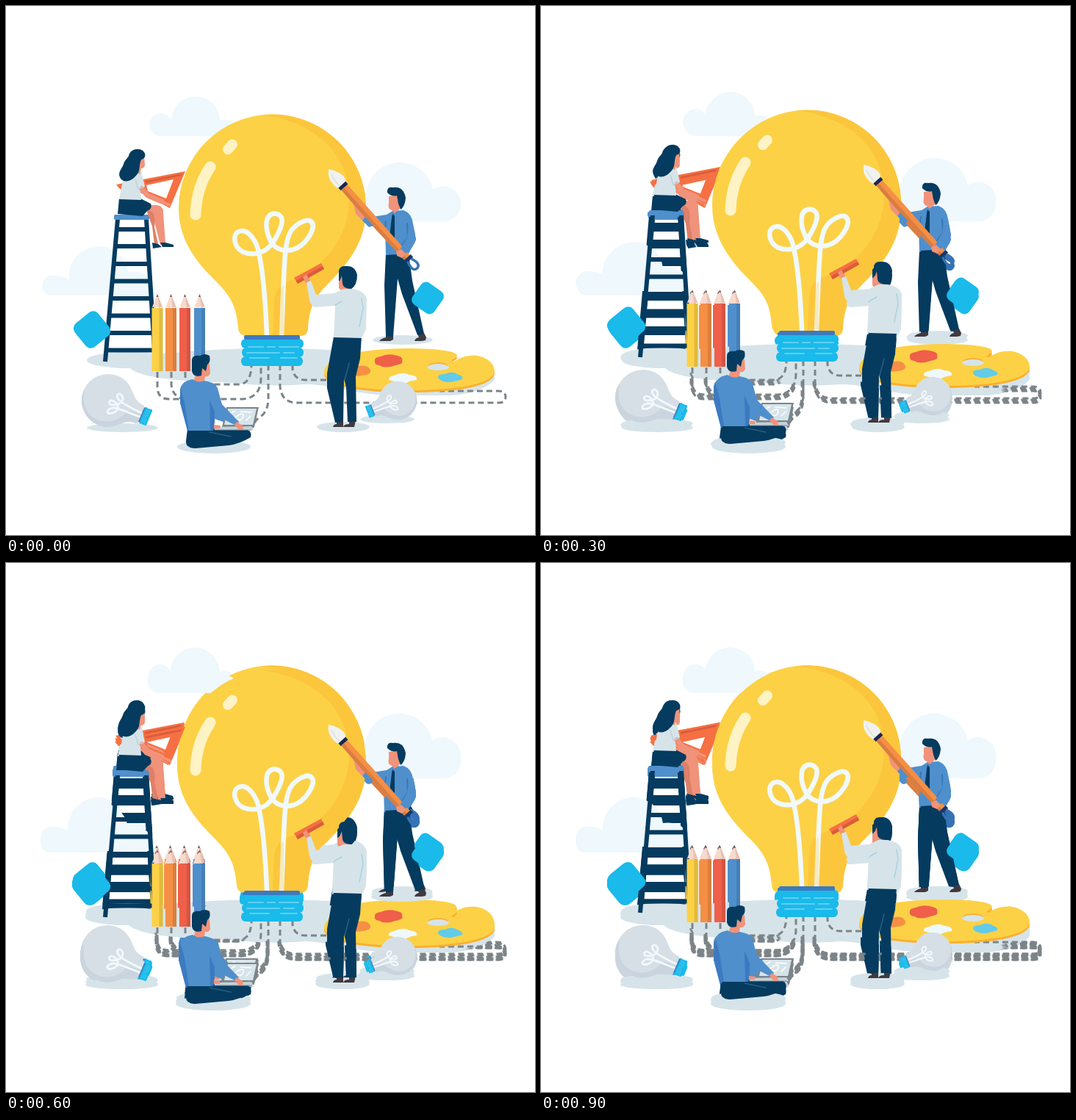
Recreate the animation shown at these times as an HTML page without scripts. Size 720 px wide and 720 px high, loop 1000 ms.

```html
<!DOCTYPE html>
<html lang="en">
<head>
<meta charset="utf-8">
<title>Creative team</title>
<style>
  html, body { margin: 0; width: 100%; height: 100%; overflow: hidden; background: #fff; }
  svg { display: block; width: 100vw; height: 100vh; }
  .navy { fill: #043b5f; }
  .blue { fill: #4f8fcc; }
  .deep { fill: #3b7ac0; }
  .cyan { fill: #1abaea; }
  .pale { fill: #d6e4ea; }
  .mist { fill: #eff8fc; }
  .skin { fill: #f0937a; }
  .red { fill: #ef5f4a; }
  .orange { fill: #f58f45; }
  .rust { fill: #f67043; }
  .sun { fill: #fcd146; }
  .shoe { fill: #3f3a40; }
  .line { fill: none; stroke-linecap: round; stroke-linejoin: round; }
  .wires { fill: none; stroke: #7c8488; stroke-width: 3; stroke-dasharray: 8 5; }
  .rungs { fill: none; stroke: #043b5f; stroke-width: 6; }
</style>
</head>
<body>
<svg viewBox="0 0 720 720">
<defs>
  <path id="glass" d="M235 275A127.5 127.5 0 0 1 490 275C490 318 468 348 441 375C421 395 413 408 411 437Q411 449 400 449H328Q316 449 316 437C313 408 306 395 286 375C258 348 235 318 235 275Z"/>
  <path id="shade" d="M348 148.300A127.500 127.500 0 0 1 490 275C490 318 468 348 441 375C421 395 413 408 411 437Q411 449 400 449H363L365 402C366 388 372 380 384 375C430 360 467 317 467 262C467 205 425 158 348 148.300Z"/>
  <path id="coil" class="line" d="M355 447C353 400 350 365 345 340C342 319 329 303 318 306.500C307 310 310 328 322 334.500C337 341 354 336 364 321C373 306 384 285 366 282.500C350 283 354 306 358.500 316C364 330 376 335 391 331.500C408 326 421 304 417 295.500C413 288 399 293 389.500 304C378 318 379 350 375 447"/>
  <g id="cap">
    <g class="cyan">
      <rect x="320" y="453" width="85" height="13" rx="6"/>
      <rect x="321" y="465" width="84" height="13" rx="6"/>
      <rect x="320" y="477" width="84" height="13" rx="6"/>
      <rect x="325" y="458" width="75" height="26"/>
    </g>
    <rect class="deep" x="324" y="448" width="76" height="6" rx="2"/>
    <path class="line" stroke="#5fd0f3" stroke-width="2" d="M330 464H350M356 464H366M372 464H398M328 472H372M378 472H392M332 479H358M374 479H396"/>
  </g>
  <g id="dim">
    <use href="#glass" fill="#d6dfe6"/>
    <use href="#shade" fill="#cad4de"/>
    <use href="#coil" stroke="#f2f9fc" stroke-width="10"/>
    <use href="#cap"/>
  </g>
  <g id="pencil">
    <path d="M0 19H15V105H0Z"/>
    <path fill="#000" fill-opacity=".11" d="M10 19H15V105H10Z"/>
    <path fill="#f6dacd" d="M7.500 0L15 19Q12.500 16 10 19Q7.500 16 5 19Q2.500 16 0 19Z"/>
    <path fill="#e8bfb2" d="M7.500 0L15 19Q12.500 16 10 19Z"/>
    <path fill="#6b5d63" d="M7.500 0L9 4H6Z"/>
  </g>
  <path id="board" d="M433 498C434 478 478 467 545 466C590 466 614 470 614 476C613 480 604 481 608 484C613 485 615 476 638 475.500C658 478 665 489 665 497C664 515 610 523 550 523C480 523 433 514 433 498Z"/>

  <g id="art">
    <g class="mist">
      <path d="M210 177A15.500 15.500 0 1 1 225 156A33 33 0 0 1 291 156Q312 150 320 177Z"/>
      <path d="M480 293V255H490A46 46 0 0 1 581 250A24 24 0 1 1 599 293Z"/>
      <path d="M60 394A13.500 13.500 0 1 1 66 367Q78 367 86 373A40 40 0 0 1 166 362Q201 358 204 394Z"/>
    </g>
    <g class="pale">
      <ellipse cx="166" cy="482" rx="56" ry="11"/>
      <path d="M167 488C167 473 205 474 240 471C300 465 400 464 470 470L640 492Q668 500 665 508C655 522 626 530 600 530H520C460 526 440 514 405 515C350 519 330 514 290 512C230 511 167 504 167 488Z"/>
      <ellipse cx="459" cy="573" rx="36" ry="7"/>
      <ellipse cx="540" cy="454.500" rx="41" ry="6.500"/>
      <ellipse cx="283" cy="600" rx="50" ry="9"/>
      <ellipse cx="158.500" cy="574" rx="48.500" ry="6"/>
      <ellipse cx="519" cy="562.500" rx="37" ry="5.500"/>
    </g>
    <g class="wires">
      <path d="M206 498V518Q206 535 222 535H322Q347 533 347 506V488"/>
      <path d="M225 498V515Q226 530 240 535"/>
      <path d="M244 498V506Q245 515 258 515H316Q334 515 334 488"/>
      <path d="M357 488V538Q355 554 346 559Q338 564 336 574"/>
      <path d="M373 488V518Q375 540 396 540H671Q680 540 680 532Q680 524 670 524H590"/>
      <path d="M390 488V494Q392 509 408 509H438"/>
    </g>

    <use href="#glass" class="sun"/>
    <use href="#shade" fill="#fcc63c"/>
    <g class="line" stroke="#fef3c4">
      <path stroke-width="15" d="M278 219Q259 247 258 284"/>
      <path stroke-width="14" d="M302 195L308 188.500"/>
    </g>
    <use href="#coil" stroke="#f1f9fb" stroke-width="6.500"/>
    <path fill="#fcc63c" fill-opacity=".3" d="M365 400L378 380V447H364Z"/>
    <use href="#cap"/>

    <!-- ladder -->
    <path class="rungs" d="M152 290L135 484M191 290L203 484"/>
    <path class="rungs" d="M150 304H193M149 327H195M147 351H197M145 374.500H198M143 398H200M141 421.500H202M139 445H203M137 468.500H204"/>
    <rect class="blue" x="147" y="284" width="48" height="7" rx="2"/>

    <!-- woman with set square -->
    <path class="rust" fill-rule="evenodd" d="M150 243L244 225L223 275L181 253L155 249ZM193 252L218 262L228 236L191 244Z"/>
    <path fill="#d85d3b" d="M190 238L240 228L238 231L190 241Z"/>
    <path class="skin" d="M188 271L205 271Q215 272 214 282L217 323L210 325L200 286Z"/>
    <path fill="#de8069" d="M190 275L200 281Q204 290 202 301L207 324L202 325L199 300Z"/>
    <path class="navy" d="M199 322L207 324L212 328L200 330ZM210 322L217 322L228 325V328H213Z"/>
    <path class="navy" d="M154 262H183L197 269Q200 276 192 279L186 286L152 283Z"/>
    <path class="pale" d="M160 232Q173 221 184 225L189 245L183 250L184 264L154 263Z"/>
    <path class="skin" d="M181 204H188L189 217Q188 221 184 221L182 229L174 225Z"/>
    <path class="navy" d="M167 204C169 194 183 192 188 199C191 203 189 208 184 209C180 218 184 225 176 232C170 239 161 241 156 235C151 226 158 222 160 215C162 209 165 208 167 204Z"/>
    <path class="line" stroke="#f0937a" stroke-width="7" d="M185 249L193 258L212 266"/>
    <path class="line" stroke="#f0937a" stroke-width="4" d="M211 266L223 271"/>
    <path class="line" stroke="#bdd3dd" stroke-width="1.500" d="M176 236L180 249L188 246"/>

    <rect class="cyan" x="-20.500" y="-20.500" width="41" height="41" rx="9" transform="translate(117 440.500) rotate(-39)"/>

    <use href="#pencil" class="sun" x="198.500" y="392"/>
    <use href="#pencil" class="orange" x="217" y="392"/>
    <use href="#pencil" class="red" x="236" y="392"/>
    <use href="#pencil" class="blue" x="256" y="392"/>

    <!-- palette -->
    <use href="#board" y="3" fill="#fbb02d"/>
    <use href="#board" class="sun"/>
    <ellipse class="pale" cx="588" cy="491" rx="15" ry="5"/>
    <path fill="#fbb02d" d="M573 491Q575 485 588 485Q601 485 603 491Q598 487 588 487Q578 487 573 491Z"/>
    <path class="red" d="M502 483Q501 478 510 477Q520 472 533 476Q541 478 539 483Q542 487 530 489Q516 494 508 489Q501 488 502 483Z"/>
    <path class="orange" d="M469 498Q468 491 481 490Q493 488 496 496Q497 502 484 503Q471 506 469 498Z"/>
    <path class="mist" d="M521 509Q520 504 528 503Q540 497 549 502Q561 503 559 509Q549 510 543 514Q531 516 528 511Z"/>
    <path fill="#61cbe9" d="M588 506Q587 501 597 501Q608 496 616 502Q623 504 621 508Q611 511 604 512Q592 512 588 506Z"/>

    <use href="#dim" transform="translate(139 537) scale(-.283 .283) rotate(67) translate(-362.500 -275)"/>
    <use href="#dim" transform="translate(533 537) scale(.206) rotate(69) translate(-362.500 -275)"/>

    <!-- man with brush -->
    <path class="shoe" d="M517 449H527V454L523 456H508Q510 453 517 451ZM560 446L569 445L572 451L571 455L566 456H556Q557 452 562 451Z"/>
    <path class="navy" d="M517 337H548L553 374L569 446L560 448L539 392L533 371L527 450H517L515 380Z"/>
    <path class="blue" d="M518 284L526 279L541 278Q552 282 554 296L558 318L548 337L517 339L516 300L492 299L486 289Z"/>
    <path class="line" stroke="#3777b8" stroke-width="2" d="M546 296L547 314L536 330M517 293L516 303"/>
    <path class="navy" d="M526 283L529 286L529 315L526 319L522 314L525 288Z"/>
    <path class="skin" d="M521 259L537 257L536 276L529 282L525 278Q519 276 521 268Z"/>
    <path class="navy" d="M519 254Q518 245 527 247Q541 245 544 261Q543 273 537 277L534 269L532 258Q525 260 519 254Z"/>
    <path class="skin" d="M473 269L480 268L491 286L485 292L476 283Z"/>
    <g transform="translate(439 222) rotate(48.200)">
      <path fill="#f0f2ef" d="M0 0Q15 -11 25 -8Q32 -4 31 2Q30 9 21 9Q8 10 0 0Z"/>
      <path class="line" stroke="#d5d9d6" d="M8 2Q18 5 29 4"/>
      <path fill="#182752" d="M28 -6H33V7H28Z"/>
      <path class="orange" d="M33 -5H90L163 -4.500V5.500L90 7L33 6Z"/>
      <path fill="#d97d42" d="M33 1.500H163V5.500L90 7L33 6Z"/>
      <path fill="#17386a" d="M161 -6H166V7H161Z"/>
      <path class="line" stroke="#3672b4" stroke-width="3.500" d="M167 -3Q180 -8 181 0Q181 8 167 4"/>
    </g>
    <path class="blue" d="M550 288Q555 297 558 318Q555 329 542 338L536 332L546 315Z"/>
    <path class="skin" d="M531 334L538 331L544 337L539 343L532 340Z"/>
    <path class="blue" d="M489 287L500 299L494 301L485 292Z"/>

    <rect class="cyan" x="-18" y="-18" width="36" height="36" rx="8" transform="translate(574 397.500) rotate(35)"/>

    <!-- man at the bulb -->
    <path class="shoe" d="M450 565L459 566V573H445Q446 569 450 569ZM467 565L476 564L474 573H459Q460 569 467 569Z"/>
    <path class="navy" d="M446 450L484 449L482 480L476 504L477 566H465L463 519L460 507L459 566L448 567L437 520L437 500Z"/>
    <path class="line" stroke="#2a5d82" stroke-width="1.500" d="M467 486L461 509"/>
    <path class="skin" d="M453 366L470 368L470 388L460 391L453 384Z"/>
    <path class="navy" d="M453 362Q453 353 463 354Q475 353 478 366Q478 380 470 385Q459 385 458 378L457 367Q454 376 453 374Z"/>
    <path class="skin" d="M405 369L411 362L415 378L410 381Z"/>
    <path class="pale" d="M409 376L415 374L422 393L447 391L459 385H472Q489 388 491 399L490 440L484 452L446 451L448 408L420 410Q414 407 413 400Z"/>
    <path class="line" stroke="#a7d2e0" stroke-width="1.500" d="M484 398L486 411L481 436M448 407L457 402"/>
    <path class="rust" d="M392 370L429 350L433 358L397 378Z"/>
    <path fill="#d85d3b" d="M395 374L431 354L433 358L397 378Z"/>
    <path class="skin" d="M404 369L409 365L412 372L408 377Z"/>

    <!-- seated man and laptop -->
    <path class="navy" d="M247 576L282 574L329 577Q335 580 333 587Q318 596 303 598L258 602Q244 602 245 592Z"/>
    <path class="line" stroke="#2a5d82" stroke-width="1.500" d="M277 580L306 586"/>
    <path class="skin" d="M262 488L277 487L278 500Q276 505 271 504L269 515L255 512Z"/>
    <path class="navy" d="M253 483Q253 474 264 476Q270 472 277 476Q279 485 274 488L272 497L267 493L266 503Q255 506 253 497Z"/>
    <path class="blue" d="M238 518Q242 510 254 508Q262 514 270 510Q285 512 288 520L296 550L317 566L313 572L284 562L282 578H247L237 540Z"/>
    <path class="deep" d="M237 518L243 540L249 578H247L237 540ZM277 536L284 552L284 566L282 578H278Z"/>
    <path fill="#7b858c" d="M300 546H344L338 573H294Z"/>
    <path class="pale" d="M302 548H341L336 570H297Z"/>
    <path class="line" stroke="#fff" stroke-width="1.500" d="M304 555L312 551M319 552L334 553M306 565L316 557Q324 552 323 559Q320 566 315 562M327 564L333 558"/>
    <path fill="#c5d2d9" d="M283 573L334 572L337 577H284Z"/>
    <path class="line" stroke="#7b858c" d="M284 577H334"/>
    <path class="blue" d="M281 535L292 540L317 566L313 571L289 559Z"/>
    <path class="skin" d="M314 566L322 571L323 577L317 577L311 570ZM283 570L292 571L291 575L283 575Z"/>
  </g>
</defs>

<!-- each pose stays beneath the later ones until the loop restarts -->
<use href="#art"/>
<use href="#art" x="-1" y="-2" visibility="hidden"><animate attributeName="visibility" values="hidden;visible" keyTimes="0;.1" calcMode="discrete" dur="1s" repeatCount="indefinite"/></use>
<use href="#art" x="-2" y="-4" visibility="hidden"><animate attributeName="visibility" values="hidden;visible" keyTimes="0;.2" calcMode="discrete" dur="1s" repeatCount="indefinite"/></use>
<use href="#art" x="0" y="-6" visibility="hidden"><animate attributeName="visibility" values="hidden;visible" keyTimes="0;.3" calcMode="discrete" dur="1s" repeatCount="indefinite"/></use>
<use href="#art" x="-1" y="-8" visibility="hidden"><animate attributeName="visibility" values="hidden;visible" keyTimes="0;.4" calcMode="discrete" dur="1s" repeatCount="indefinite"/></use>
<use href="#art" x="-2" y="0" visibility="hidden"><animate attributeName="visibility" values="hidden;visible" keyTimes="0;.5" calcMode="discrete" dur="1s" repeatCount="indefinite"/></use>
<use href="#art" x="0" y="-2" visibility="hidden"><animate attributeName="visibility" values="hidden;visible" keyTimes="0;.6" calcMode="discrete" dur="1s" repeatCount="indefinite"/></use>
<use href="#art" x="-1" y="-4" visibility="hidden"><animate attributeName="visibility" values="hidden;visible" keyTimes="0;.7" calcMode="discrete" dur="1s" repeatCount="indefinite"/></use>
<use href="#art" x="-2" y="-6" visibility="hidden"><animate attributeName="visibility" values="hidden;visible" keyTimes="0;.8" calcMode="discrete" dur="1s" repeatCount="indefinite"/></use>
<use href="#art" x="0" y="-8" visibility="hidden"><animate attributeName="visibility" values="hidden;visible" keyTimes="0;.9" calcMode="discrete" dur="1s" repeatCount="indefinite"/></use>
</svg>
</body>
</html>
```
